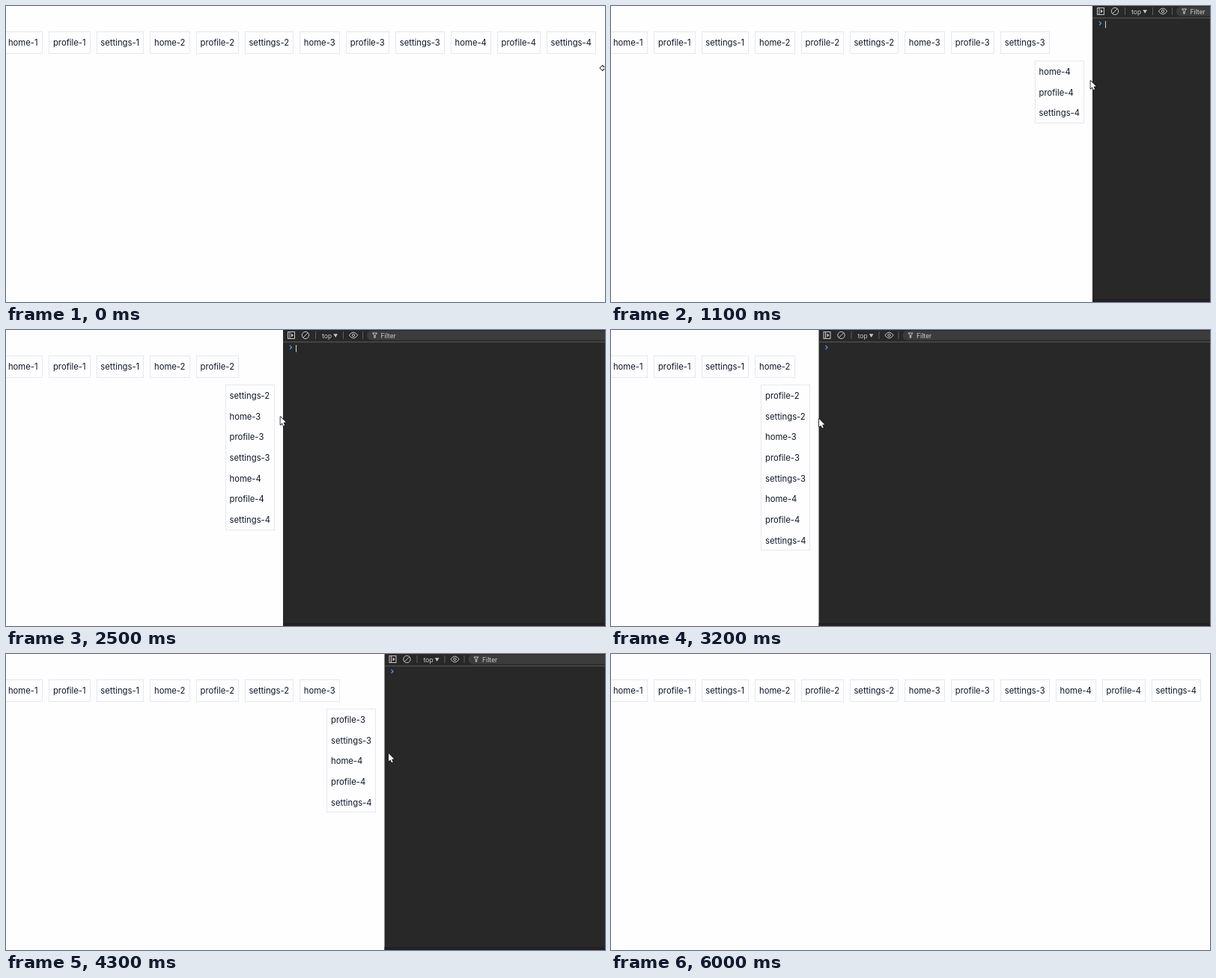
These frames come from a looping animation (800x396 px, 6800 ms). An HTML page with a canvas:

```html
<!DOCTYPE html>
<html lang="en">
<head>
<meta charset="utf-8">
<title>Overflow menu</title>
<style>
html, body { margin: 0; width: 100%; height: 100%; overflow: hidden; background: #fefdff; }
canvas { display: block; width: 100vw; height: 100vh; }
</style>
</head>
<body>
<canvas id="stage" width="800" height="396"></canvas>
<script>
const W = 800, H = 396, LOOP = 6800, STEP = 100;
const ctx = document.getElementById('stage').getContext('2d');

const PAGE = '#fefdff', BORDER = '#e4e9f1', INK = '#0f172a';
const PANEL = '#282829', PILL = '#3c3c3d', RULE = '#5e5e5f', ICON = '#c7c7c7';
const UI_FONT = '11.25px Inter, sans-serif';
const TOOL_FONT = '9px Roboto, sans-serif';

const GAP = 8.5, MARGIN = 12, PITCH = 27.65;
const lefts = [-3, 57, 121, 192, 254, 319, 392, 454, 520, 594, 656, 722, 796];
const items = Array.from({ length: 12 }, (_, i) => ({
  label: ['home', 'profile', 'settings'][i % 3] + '-' + (Math.floor(i / 3) + 1),
  left: lefts[i],
  right: lefts[i + 1] - GAP
}));

// [time, value] keys
const edgeKeys = [[0, 800], [400, 767], [700, 724], [1100, 643], [1400, 577], [2100, 440],
  [2500, 370], [2800, 322], [3200, 277.5], [3700, 277.5], [4000, 368], [4300, 505.5],
  [4400, 545], [5000, 674], [5100, 706], [5800, 801]];
const pointerGap = [[0, -3], [1100, -2.5], [2500, -3.5], [3200, 0.5], [3700, 0.5], [4300, 5.5], [5800, 6]];
const pointerY = [[0, 78], [1100, 100], [2500, 116], [3200, 119], [3700, 119], [4300, 133], [5000, 136], [5800, 138]];

function valueAt(keys, t) {
  const i = keys.findIndex(k => k[0] > t);
  if (i < 0) return keys[keys.length - 1][1];
  const [t0, a] = keys[i - 1], [t1, b] = keys[i];
  return a + (b - a) * (t - t0) / (t1 - t0);
}

function trace(points, closed) {
  ctx.beginPath();
  points.forEach(([x, y]) => ctx.lineTo(x, y));
  if (closed) ctx.closePath();
}

function line(points, color, width = 1) {
  trace(points);
  ctx.strokeStyle = color;
  ctx.lineWidth = width;
  ctx.stroke();
}

function shape(points, fill) {
  trace(points, true);
  ctx.fillStyle = fill;
  ctx.fill();
}

function text(str, x, y, font, color, align = 'left') {
  ctx.font = font;
  ctx.fillStyle = color;
  ctx.textAlign = align;
  ctx.fillText(str, x, y);
}

function box(x, y, right, bottom) {
  const l = Math.round(x) + 0.5, t = Math.round(y) + 0.5;
  ctx.strokeStyle = BORDER;
  ctx.lineWidth = 1;
  ctx.strokeRect(l, t, Math.round(right) - 0.5 - l, Math.round(bottom) - 0.5 - t);
}

function drawPage(edge) {
  ctx.fillStyle = PAGE;
  ctx.fillRect(0, 0, W, H);
  const hidden = [];
  for (const it of items) {
    if (it.right > edge - MARGIN) { hidden.push(it); continue; }
    box(it.left, 34, it.right, 64);
    text(it.label, (it.left + it.right) / 2, 53, UI_FONT, INK, 'center');
  }
  if (!hidden.length) return;
  const left = edge - 77.5;
  box(left, 73, left + 66, 74 + PITCH * hidden.length);
  hidden.forEach((it, i) => text(it.label, left + 6, 92 + PITCH * i, UI_FONT, INK));
}

function drawPanel(edge, caret) {
  ctx.save();
  ctx.translate(edge, 0);
  ctx.fillStyle = PANEL;
  ctx.fillRect(0, 0, W, H);
  ctx.fillStyle = '#231f23';
  ctx.fillRect(0, 392, W, 4);
  ctx.fillStyle = RULE;
  ctx.fillRect(0, 15.5, W, 1);
  ctx.fillStyle = PILL;
  ctx.beginPath();
  ctx.roundRect(112, 1, W, 12.5, 6);
  ctx.fill();

  // sidebar toggle
  ctx.strokeStyle = ICON;
  ctx.lineWidth = 1;
  ctx.strokeRect(6.5, 2.5, 9, 9);
  line([[9, 2.5], [9, 11.5]], ICON);
  shape([[11, 4.5], [14, 7], [11, 9.5]], ICON);

  // clear
  ctx.beginPath();
  ctx.arc(30, 7, 4.7, 0, Math.PI * 2);
  ctx.stroke();
  line([[26.7, 10.3], [33.3, 3.7]], ICON);

  for (const x of [43.5, 80.5, 106.5]) line([[x, 2], [x, 12]], RULE);
  text('top', 52, 10.5, TOOL_FONT, ICON);
  shape([[67.3, 5.3], [73, 5.3], [70.15, 10]], ICON);

  // eye
  ctx.strokeStyle = ICON;
  ctx.lineWidth = 1;
  ctx.beginPath();
  ctx.moveTo(88.3, 7);
  ctx.quadraticCurveTo(94, -1, 99.7, 7);
  ctx.quadraticCurveTo(94, 15, 88.3, 7);
  ctx.stroke();
  ctx.beginPath();
  ctx.arc(94, 7, 1.7, 0, Math.PI * 2);
  ctx.stroke();

  // filter
  trace([[119.5, 4], [125.5, 4], [123.2, 7], [123.2, 10.3], [121.8, 10.3], [121.8, 7]], true);
  ctx.stroke();
  text('Filter', 130.5, 10.5, TOOL_FONT, ICON);

  line([[9, 20.7], [11.6, 23.2], [9, 25.7]], '#5f8fdd', 1.2);
  if (caret) line([[17.5, 20], [17.5, 29.5]], '#d6d6d6');
  ctx.restore();
}

function outlined(points) {
  trace(points, true);
  ctx.lineJoin = 'round';
  ctx.strokeStyle = '#111';
  ctx.lineWidth = 1.6;
  ctx.stroke();
  ctx.fillStyle = '#fff';
  ctx.fill();
  ctx.lineJoin = 'miter';
}

function drawArrow(x, y) {
  const form = [[0, 0], [0, 10.6], [2.4, 8.4], [4.1, 12.2], [5.7, 11.5], [4.1, 7.8], [7.4, 7.6]];
  outlined(form.map(([dx, dy]) => [x + dx, y + dy]));
}

function drawResize(x, y) {
  const half = [[-7, 0], [-3.5, -3.3], [-3.5, -1], [3.5, -1], [3.5, -3.3], [7, 0]];
  const lower = half.slice(1, 5).reverse().map(([dx, dy]) => [dx, -dy]);
  outlined([...half, ...lower].map(([dx, dy]) => [x + dx, y + dy]));
}

function draw(t) {
  const edge = valueAt(edgeKeys, t);
  drawPage(edge);
  if (edge < W) {
    drawPanel(edge, t < 2850 || t > 4550);
    drawArrow(edge + valueAt(pointerGap, t), valueAt(pointerY, t));
  } else if (t < STEP) {
    drawResize(800.5, 83);
  }
}

const start = performance.now();
function tick() {
  const t = (performance.now() - start) % LOOP;
  draw(Math.floor(t / STEP) * STEP);
  requestAnimationFrame(tick);
}
tick();
</script>
</body>
</html>
```
